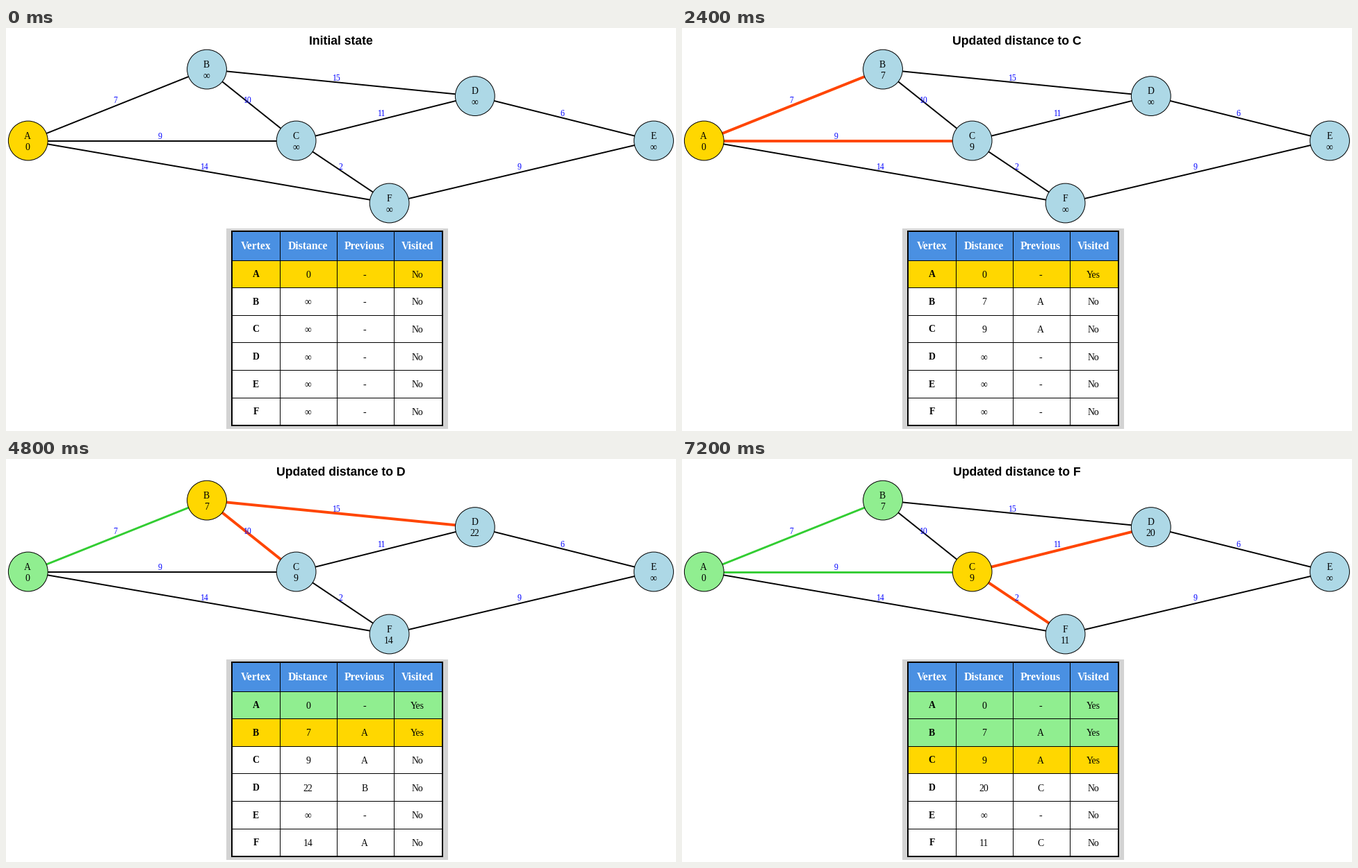
Recreate the animation shown at these times as a matplotlib script. Size 964 by 581 pixels, loop 8000 ms.

```python
from itertools import islice
from math import inf

import matplotlib.pyplot as plt
from matplotlib.animation import FuncAnimation
from matplotlib.patches import Circle, Rectangle

W, H, DPI = 964, 581, 64
PX = 72 / DPI  # points per pixel
STEPS, STEP_MS = 10, 800

GOLD, GREEN, BLUE = "#ffd700", "#90ee90", "#add8e6"
RED_LINE, GREEN_LINE = "#ff4500", "#32cd32"
SERIF, SANS = "Liberation Serif", "Liberation Sans"

NODES = {
    "A": (31.8, 162.5), "B": (289, 59.6), "C": (417.6, 162.5),
    "D": (674.8, 98.1), "E": (932, 162.5), "F": (551.6, 252.5),
}
EDGES = {
    "AB": 7, "AC": 9, "AF": 14, "BC": 10, "BD": 15,
    "CD": 11, "CF": 2, "DE": 6, "EF": 9,
}
RADIUS = 28.4

COLS = [325, 393.5, 475.5, 557.5, 628]
TEXT_X = [359.5, 434.5, 516, 592]
HEADERS = ["Vertex", "Distance", "Previous", "Visited"]
TOP, HEAD_BOTTOM, BOTTOM = 293, 334.5, 573
ROW_H = 39.65


def neighbours(v):
    for edge, cost in EDGES.items():
        if v in edge:
            yield edge.replace(v, ""), edge, cost


def dijkstra(start):
    """Yield one snapshot for each visit and each improved distance."""
    dist = dict.fromkeys(NODES, inf)
    prev = dict.fromkeys(NODES, "-")
    dist[start] = 0
    visited, active, current = set(), set(), start

    def snapshot(title):
        tree = {"".join(sorted(prev[v] + v)) for v in visited}
        return dict(title=title, dist=dict(dist), prev=dict(prev),
                    visited=set(visited), active=set(active),
                    tree=tree, current=current)

    yield snapshot("Initial state")
    while len(visited) < len(NODES):
        current = min((v for v in NODES if v not in visited), key=dist.get)
        visited.add(current)
        active.clear()
        yield snapshot(f"Visiting vertex {current}")
        for v, edge, cost in neighbours(current):
            if v in visited:
                continue
            active.add(edge)
            if dist[current] + cost < dist[v]:
                dist[v] = dist[current] + cost
                prev[v] = current
                yield snapshot(f"Updated distance to {v}")


plt.rcParams["text.hinting"] = "native"
fig = plt.figure(figsize=(W / DPI, H / DPI), dpi=DPI, facecolor="white")
ax = fig.add_axes([0, 0, 1, 1])
ax.set_xlim(0, W)
ax.set_ylim(H, 0)
ax.axis("off")


def label(x, y, text, size, ha="center", font=SERIF, **style):
    return ax.text(x, y, text, fontsize=size * PX, family=font, ha=ha,
                   va="baseline", zorder=5, **style)


def line(xs, ys, width, z=1):
    return ax.plot(xs, ys, color="black", lw=width * PX, zorder=z,
                   solid_capstyle="butt")[0]


def box(x0, y0, x1, y1, color, z=1):
    return ax.add_patch(Rectangle((x0, y0), x1 - x0, y1 - y0, fc=color,
                                  ec="none", lw=0, zorder=z))


title = label(482, 24, "", 17.6, font=SANS, weight="bold")

# Graph
edge_lines = {}
for edge, cost in EDGES.items():
    (x0, y0), (x1, y1) = (NODES[v] for v in edge)
    edge_lines[edge] = line([x0, x1], [y0, y1], 1.95)
    label((x0 + x1) / 2, (y0 + y1) / 2 - 3, str(cost), 11.7, ha="right",
          color="blue")

circles, values = {}, {}
for v, (x, y) in NODES.items():
    circles[v] = ax.add_patch(Circle((x, y), RADIUS, ec="black", lw=PX,
                                     zorder=3))
    label(x - 0.5, y - 3, v, 13.7)
    values[v] = label(x - 0.5, y + 13, "", 13.7)

# Table
box(317, 289, 636, 577.5, "#d3d3d3")
box(COLS[0], TOP, COLS[-1], HEAD_BOTTOM, "#4a90e2", 2)
for x, text in zip(TEXT_X, HEADERS):
    label(x, 319, text, 15.6, color="white", weight="bold")

rows, cells = {}, {}
for i, v in enumerate(NODES):
    y = HEAD_BOTTOM + i * ROW_H
    rows[v] = box(COLS[0], y, COLS[-1], y + ROW_H, "white", 2)
    line([COLS[0], COLS[-1]], [y, y], 1, 3)
    label(TEXT_X[0], y + 24.7, v, 13.7, weight="bold")
    cells[v] = [label(x, y + 25.2, "", 13.7) for x in TEXT_X[1:]]
for x in COLS[1:-1]:
    line([x, x], [TOP, BOTTOM], 1, 3)
ax.add_patch(Rectangle((COLS[0], TOP), COLS[-1] - COLS[0], BOTTOM - TOP,
                       fill=False, ec="black", lw=2 * PX, zorder=4))

states = list(islice(dijkstra("A"), STEPS))


def draw(i):
    s = states[i]
    title.set_text(s["title"])
    for edge, ln in edge_lines.items():
        if edge in s["active"]:
            color, width = RED_LINE, 3.9
        elif edge in s["tree"]:
            color, width = GREEN_LINE, 2.9
        else:
            color, width = "black", 1.95
        ln.set(color=color, linewidth=width * PX)
    for v in NODES:
        seen = v in s["visited"]
        mark = GOLD if v == s["current"] else GREEN if seen else None
        circles[v].set_facecolor(mark or BLUE)
        rows[v].set_facecolor(mark or "white")
        d = "∞" if s["dist"][v] == inf else str(s["dist"][v])
        values[v].set_text(d)
        for cell, text in zip(cells[v], (d, s["prev"][v],
                                         "Yes" if seen else "No")):
            cell.set_text(text)
    return []


anim = FuncAnimation(fig, draw, frames=STEPS, interval=STEP_MS,
                     init_func=lambda: draw(0), repeat=True, repeat_delay=0)
plt.show()
```
